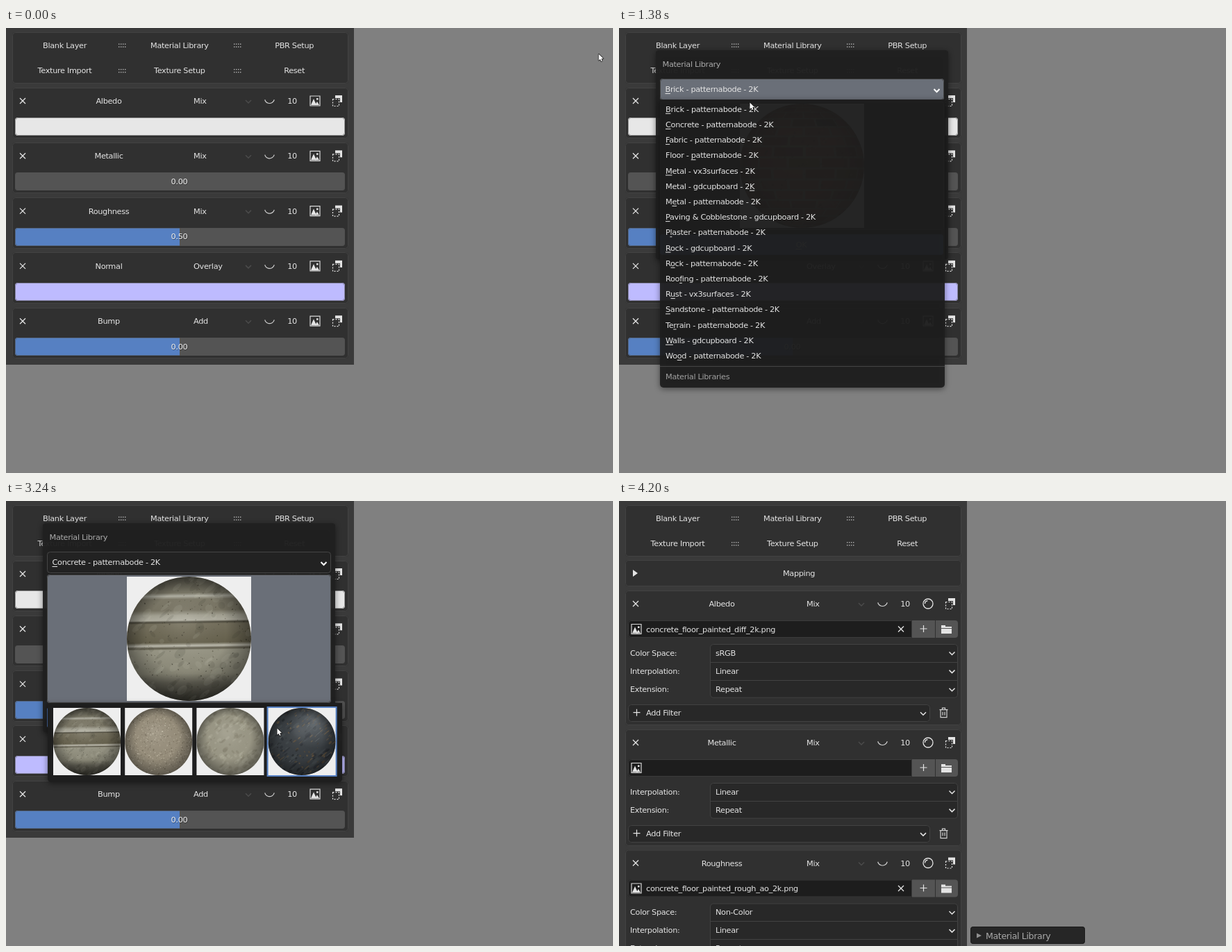
Animation of 874x641 px, one loop 4920 ms. Source, as an HTML page with a canvas:

```html
<!DOCTYPE html>
<html lang="en">
<head>
<meta charset="utf-8">
<title>Material Library</title>
<style>
html, body { margin: 0; width: 100%; height: 100%; overflow: hidden; background: #808080; }
canvas { display: block; }
</style>
</head>
<body>
<canvas id="stage" width="874" height="641"></canvas>
<script>
const LOOP = 4920, STEP = 60, BLUE = '#5680c2', SLATE = '#6a6f78', INK = '#e4e4e4', DIM = '#ababab';
const c = document.getElementById('stage').getContext('2d');

// "~" marks the letter to underline
const NAMES = ['~Brick - patternabode', '~Concrete - patternabode', '~Fabric - patternabode',
  'Floor - ~patternabode', '~Metal - vx3surfaces', 'Metal - gdcupboard - 2~K', 'M~etal - patternabode',
  '~Paving & Cobblestone - gdcupboard', 'P~laster - patternabode', '~Rock - gdcupboard',
  'R~ock - patternabode', 'Roo~fing - patternabode', 'R~ust - vx3surfaces', '~Sandstone - patternabode',
  'Te~rrain - patternabode', '~Walls - gdcupboard', 'Wo~od - patternabode']
  .map(n => n.includes('2') ? n : n + ' - 2K');

// time, x, y of the pointer tip
const PATH = [[0, 854, 37], [360, 264, 37], [540, 264, 37], [1020, 190, 91], [1080, 190, 92], [1380, 189, 107],
  [1560, 177, 133], [1920, 177, 133], [2100, 177, 151], [2460, 177, 151], [3000, 396, 336], [3240, 391, 327],
  [3480, 380, 312], [3900, 380, 312], [3960, 452, 322], [4020, 592, 347], [4080, 720, 382], [4140, 828, 412]];

function pointer(t) {
  const i = PATH.findIndex(p => p[0] >= t);
  if (i < 0) return null;
  if (!i) return PATH[0].slice(1);
  const [t0, x0, y0] = PATH[i - 1], [t1, x1, y1] = PATH[i];
  const u = (t - t0) / (t1 - t0);
  const e = t1 - t0 > 60 && t < 3900 ? u * u * (3 - 2 * u) : u;
  const dip = i === 1 ? 15 * Math.sin(Math.PI * u) : 0;
  return [x0 + (x1 - x0) * e, y0 + (y1 - y0) * e + dip];
}

function seeded(s) {
  return () => (s = (s * 16807) % 2147483647) / 2147483647;
}

function box(x0, y0, x1, y1, fill, line, r = 4) {
  c.beginPath();
  c.roundRect(x0, y0, x1 - x0, y1 - y0, r);
  c.fillStyle = fill;
  c.fill();
  if (line) {
    c.beginPath();
    c.roundRect(x0 + .5, y0 + .5, x1 - x0 - 1, y1 - y0 - 1, r);
    stroke(line);
  }
}

function popup(...args) {
  c.save();
  c.shadowColor = 'rgba(0,0,0,.5)';
  c.shadowBlur = 9;
  c.shadowOffsetY = 2;
  box(...args);
  c.restore();
}

function rect(x, y, w, h, fill) {
  c.fillStyle = fill;
  c.fillRect(x, y, w, h);
}

function stroke(color, width = 1) {
  c.strokeStyle = color;
  c.lineWidth = width;
  c.stroke();
}

function lines(color, width, ...runs) {
  c.beginPath();
  for (const p of runs)
    for (let i = 0; i < p.length; i += 2) c[i ? 'lineTo' : 'moveTo'](p[i], p[i + 1]);
  stroke(color, width);
}

function shape(color, ...p) {
  c.beginPath();
  for (let i = 0; i < p.length; i += 2) c.lineTo(p[i], p[i + 1]);
  c.closePath();
  c.fillStyle = color;
  c.fill();
}

function text(s, x, y, color = INK, align = 'left', size = 11.3) {
  const mark = s.indexOf('~');
  s = s.replace('~', '');
  c.font = `${size}px "DejaVu Sans", sans-serif`;
  c.letterSpacing = -size / 34 + 'px';
  c.textAlign = 'left';
  c.fillStyle = color;
  if (align === 'center') x -= c.measureText(s).width / 2;
  c.fillText(s, x, y + 4);
  if (mark >= 0) {
    const w = n => c.measureText(s.slice(0, n)).width;
    rect(x + w(mark), y + 6, w(mark + 1) - w(mark), 1, color);
  }
}

const mid = (s, x, y, color) => text(s, x, y, color, 'center');

// icons, all placed by their centre
const cross = (x, y) => lines(INK, 1.3, [x - 4, y - 4, x + 4, y + 4], [x + 4, y - 4, x - 4, y + 4]);
const plus = (x, y) => lines(INK, 1.2, [x - 5, y, x + 5, y], [x, y - 5, x, y + 5]);
const chevron = (x, y, color = INK, w = 1.5) => lines(color, w, [x - 4, y - 2, x, y + 2, x + 4, y - 2]);

function dots(x, y) {
  for (let i = 0; i < 8; i++) rect(x - 5 + (i % 4) * 3, y - 2 + (i >> 2) * 4, 1.4, 1.4, '#b5b5b5');
}

function picture(x, y) {
  c.beginPath();
  c.rect(x - 7, y - 7, 14, 14);
  stroke('#d8d8d8', 1.2);
  shape(INK, x - 6, y + 6, x - 2, y - 3, x + 2, y + 6);
  shape(INK, x, y + 6, x + 3, y + 1, x + 6, y + 6);
  rect(x + 2, y - 4, 2.5, 2.5, INK);
}

function globe(x, y) {
  c.beginPath();
  c.arc(x, y, 7, 0, 7);
  stroke(INK, 1.3);
  c.beginPath();
  c.arc(x, y, 4.5, Math.PI, 4.6);
  stroke(INK, 1.3);
}

function copies(x, y) {
  rect(x - 3, y - 8, 10, 10, INK);
  rect(x - 8, y - 4, 12, 12, '#303030');
  c.setLineDash([2, 2]);
  c.strokeStyle = INK;
  c.lineWidth = 1.2;
  c.strokeRect(x - 6.5, y - 2.5, 9, 10);
  c.setLineDash([]);
}

function folder(x, y) {
  rect(x - 7, y - 6, 6, 3, INK);
  rect(x - 7, y - 4, 15, 2, INK);
  rect(x - 7, y - 1, 15, 7, INK);
}

function bin(x, y) {
  lines('#d0d0d0', 1.2, [x - 6, y - 4, x + 6, y - 4], [x - 2, y - 4, x - 2, y - 6.5, x + 2, y - 6.5, x + 2, y - 4],
    [x - 4.5, y - 4, x - 4.5, y + 7, x + 4.5, y + 7, x + 4.5, y - 4], [x - 1.5, y - 1, x - 1.5, y + 4], [x + 1.5, y - 1, x + 1.5, y + 4]);
}

// rendered material spheres, on a unit circle
function bricks(rnd) {
  rect(-1, -1, 2, 2, '#a09a78');
  const at = (lat, lon) => [Math.cos(lat) * Math.sin(lon), Math.sin(lat)];
  const clamp = a => Math.max(-1.57, Math.min(1.57, a));
  const tones = ['#a4533b', '#b06146', '#934a35', '#b96a4e', '#84442f', '#a15c42', '#86682c', '#54402d'];
  for (let row = -9; row < 9; row++)
    for (let col = -4; col < 4; col++) {
      const lat = row * .18 - .12, lon = col * .54 + (row % 2 ? .27 : 0) + .04;
      const tone = !row && !col ? '#95742f' : tones[Math.floor(rnd() * (.3 + .7 * rnd()) * 8)];
      const a = clamp(lat), b = clamp(lat + .145), l = clamp(lon - .25), r = clamp(lon + .245);
      shape(tone, ...at(a, l), ...at(a, r), ...at(b, r), ...at(b, l));
    }
}

function bands() {
  const g = c.createLinearGradient(0, -1, .03, 1);
  const stops = [0, '#5b594d', .13, '#7a7767', .155, '#b5b4a7', .18, '#807c6b', .27, '#7a7665', .31, '#a5a394',
    .35, '#b2b0a2', .365, '#4d4a3d', .38, '#76715e', .53, '#68634f', .555, '#c2c0b3', .575, '#615d4d',
    .59, '#9a9887', .78, '#8d8b7a', .85, '#68665a', 1, '#3a3931'];
  for (let i = 0; i < stops.length; i += 2) g.addColorStop(stops[i], stops[i + 1]);
  rect(-1, -1, 2, 2, g);
}

function specks(rnd, n, size, stretch, colors) {
  for (let i = 0; i < n; i++) {
    c.beginPath();
    c.ellipse(rnd() * 2 - 1, rnd() * 2 - 1, size * (.3 + rnd()), size * (.3 + rnd()) * stretch, -.7, 0, 7);
    c.fillStyle = colors[i % colors.length];
    c.fill();
  }
}

const SKINS = {
  brick(rnd) {
    bricks(rnd);
    specks(rnd, 300, .022, .7, ['#3a2a1c55', '#d0906c44']);
  },
  bands(rnd) {
    bands();
    specks(rnd, 120, .09, .6, ['#d0cebf1c', '#2c2a221c']);
    specks(rnd, 240, .01, 1, ['#26241c88', '#3e3a2c77']);
  },
  gravel(rnd) {
    rect(-1, -1, 2, 2, '#9a917e');
    specks(rnd, 800, .017, 1, ['#d0c8b488', '#5f574677']);
  },
  cement(rnd) {
    rect(-1, -1, 2, 2, '#9d9a88');
    specks(rnd, 240, .08, .6, ['#c8c5b433', '#6e6b5938']);
  },
  paint(rnd) {
    rect(-1, -1, 2, 2, '#393e42');
    specks(rnd, 90, .13, .35, ['#555c6044', '#1c202455']);
    specks(rnd, 150, .05, .5, ['#80664488', '#5c4c3699', '#20242688']);
    specks(rnd, 24, .1, .13, ['#8c929266', '#8a6a4088']);
    const sheen = c.createRadialGradient(.4, -.6, 0, .4, -.6, .8);
    sheen.addColorStop(0, '#aab2b866');
    sheen.addColorStop(1, '#aab2b800');
    rect(-1, -1, 2, 2, sheen);
  }
};

function ball(kind, x, y, size) {
  const r = size / 2;
  rect(x, y, size, size, '#eeeeee');
  c.save();
  c.translate(x + r, y + r);
  c.scale(r, r);
  c.beginPath();
  c.arc(0, 0, 1, 0, 7);
  c.clip();
  SKINS[kind](seeded(4211));
  const g = c.createRadialGradient(-.1, -.3, .1, 0, 0, 1);
  g.addColorStop(0, 'rgba(255,255,255,.08)');
  g.addColorStop(.6, 'rgba(0,0,0,.03)');
  g.addColorStop(1, 'rgba(0,0,0,.4)');
  rect(-1, -1, 2, 2, g);
  c.restore();
}

const card = (y0, y1) => box(9, y0, 493, y1, '#303030', '#424242');

function toolbar(hover) {
  card(6, 80);
  [['Blank Layer', 'Material Library', 'PBR Setup'], ['Texture Import', 'Texture Setup', 'Reset']].forEach((row, j) => {
    const y = 24.5 + j * 36.5;
    row.forEach((s, i) => mid(s, 84.5 + i * 165.3, y, hover && s === 'Material Library' ? '#fff' : INK));
    dots(167, y);
    dots(333, y);
  });
}

function header(name, mode, y, icon) {
  cross(24, y);
  mid(name, 148, y);
  text(mode, 270, y);
  chevron(349, y + 1, '#4b4b4b');
  c.beginPath();
  c.arc(379.5, y - 3.5, 7, .25, Math.PI - .25);
  stroke('#cfcfcf', 1.2);
  mid('10', 412, y);
  icon(445, y);
  copies(477, y);
}

function channels() {
  const rows = [['Albedo', 'Mix', '#e7e7e7'], ['Metallic', 'Mix', '#545454', '0.00'],
    ['Roughness', 'Mix', '#545454', '0.50', 1], ['Normal', 'Overlay', '#bebbff'], ['Bump', 'Add', '#545454', '0.00', 1]];
  rows.forEach(([name, mode, fill, value, half], i) => {
    const y = 85.5 + i * 79.3, top = Math.round(y + 43.4);
    card(Math.round(y), Math.round(y + 73.5));
    header(name, mode, y + 19.5, picture);
    box(13, top, 488, top + 26, fill);
    if (half) box(13, top, 250, top + 26, BLUE, '', [4, 0, 0, 4]);
    box(13, top, 488, top + 26, 'transparent', 'rgba(80,80,80,.5)');
    if (value) {
      mid(value, 250, y + 57, 'rgba(0,0,0,.4)');
      mid(value, 249.5, y + 56, '#f0f0f0');
    }
  });
}

function layer(y, name, file, options) {
  const last = y + 89.5 + (options.length - 1) * 26.1;
  card(y, Math.round(last + 52));
  header(name, 'Mix', y + 19, globe);
  box(13, y + 43, 422, y + 68, '#1d1d1d', '#3b3b3b', [4, 0, 0, 4]);
  box(422, y + 43, 455, y + 68, '#545454', '', 0);
  box(456, y + 43, 488, y + 68, '#545454', '', [0, 4, 4, 0]);
  picture(25, y + 55.5);
  if (file) {
    text(file, 39, y + 55.5);
    cross(406, y + 55.5);
  }
  plus(438.5, y + 55);
  folder(471, y + 56);
  box(131, y + 77, 488, last + 13, '#282828', '#424242');
  options.forEach(([label, value], i) => {
    const cy = y + 89.5 + i * 26.1;
    text(label + ':', 16, cy);
    text(value, 139, cy);
    chevron(479.5, cy + 1);
    if (i) rect(131, Math.round(cy - 13), 357, 1, '#424242');
  });
  const add = last + 34;
  box(13, Math.round(add - 12), 448, Math.round(add + 13), '#282828', '#424242');
  plus(25.5, add);
  text('Add Filter', 39, add);
  chevron(438, add + 1.5);
  bin(467.5, add);
}

function result() {
  rect(0, 0, 501, 641, '#3a3a3a');
  toolbar();
  card(85, 123);
  shape(INK, 20, 99, 27, 104, 20, 109);
  mid('Mapping', 259, 104);
  const shared = [['Interpolation', 'Linear'], ['Extension', 'Repeat']];
  layer(129, 'Albedo', 'concrete_floor_painted_diff_2k.png', [['Color Space', 'sRGB'], ...shared]);
  layer(329, 'Metallic', '', shared);
  layer(502.5, 'Roughness', 'concrete_floor_painted_rough_ao_2k.png', [['Color Space', 'Non-Color'], ...shared]);
  box(506, 613, 671, 638, '#262626', '#1c1c1c');
  shape('#909090', 515, 622.5, 522, 626, 515, 629.5);
  text('Material Library', 528, 626.5, '#a8a8a8', 'left', 12.6);
}

function dialog(t, y) {
  const listed = t >= 1080 && t < 1620, thumbs = t >= 2160 && t < 3300;
  popup(53, 32, 474, 333, 'rgba(32,32,32,.94)');
  text('Material Library', 62.5, 52, DIM);

  const overMenu = t < 1080 && y > 74 && y < 105;
  box(59, 73, 468, 104, listed ? SLATE : overMenu ? '#303030' : '#222222', '#454545');
  text(NAMES[t < 1620 ? 0 : 1], 66.5, 88);
  chevron(457.5, 90, '#fff', 2);

  const overView = t < 2160 && y > 106 && y < 291 && !listed;
  box(59, 106, 468, 291, thumbs ? SLATE : overView ? '#343434' : '#2b2b2b', '#454545');
  ball(t < 1620 ? 'brick' : t < 3300 ? 'bands' : 'paint', 174, 109, 179);

  box(59, 297, 467, 327, t >= 3300 && t < 3720 ? '#5f8dd5' : BLUE, '#476aa3');
  mid('~OK', 262.5, 312, '#f2f2f2');

  if (listed) menu(y);
  if (thumbs) chooser(t);
}

function menu(y) {
  popup(59, 103, 469, 518, 'rgba(30,30,30,.92)', '', [0, 0, 5, 5]);
  const hot = y > 109 ? Math.floor((y - 105.4) / 22.2) : -1;
  NAMES.forEach((name, i) => {
    const cy = 116.7 + i * 22.2;
    if (i === hot) rect(59, cy - 11, 410, 22, BLUE);
    text(name, 67, cy);
  });
  rect(59, 487, 410, 1, '#444444');
  text('Material Libraries', 67, 501.5, '#a0a0a0');
}

function chooser(t) {
  const [x, y] = pointer(t);
  popup(60, 291, 484, 405, 'rgba(30,30,30,.98)', '', [0, 0, 5, 5]);
  ['bands', 'gravel', 'cement', 'paint'].forEach((kind, i) => {
    const left = 68 + i * 103.2;
    if (y > 295 && x > left - 3 && x < left + 100) rect(left - 2, 296, 101, 101, BLUE);
    ball(kind, left, 298, 97);
  });
}

function arrow(x, y) {
  c.beginPath();
  [0, 0, 0, 9.3, 2.1, 7.4, 3.6, 10.6, 5, 9.9, 3.7, 6.8, 6.5, 6.6]
    .forEach((v, i, p) => { if (i % 2) c.lineTo(x - .5 + p[i - 1], y + .5 + v); });
  c.closePath();
  c.lineJoin = 'round';
  stroke('rgba(20,20,20,.85)', 1.6);
  c.fillStyle = '#fff';
  c.fill();
  c.lineJoin = 'miter';
}

function draw(t) {
  rect(0, 0, 874, 641, '#808080');
  if (t >= 4200) return result();
  const [x, y] = pointer(t);
  rect(0, 0, 501, 485, '#3a3a3a');
  toolbar(t >= 300 && t < 540);
  channels();
  if (t >= 540) dialog(t, y);
  arrow(x, y);
}

let shown = -1;
function tick() {
  const t = Math.floor(performance.now() % LOOP / STEP) * STEP;
  if (t !== shown) draw(shown = t);
  requestAnimationFrame(tick);
}
tick();
</script>
</body>
</html>
```
